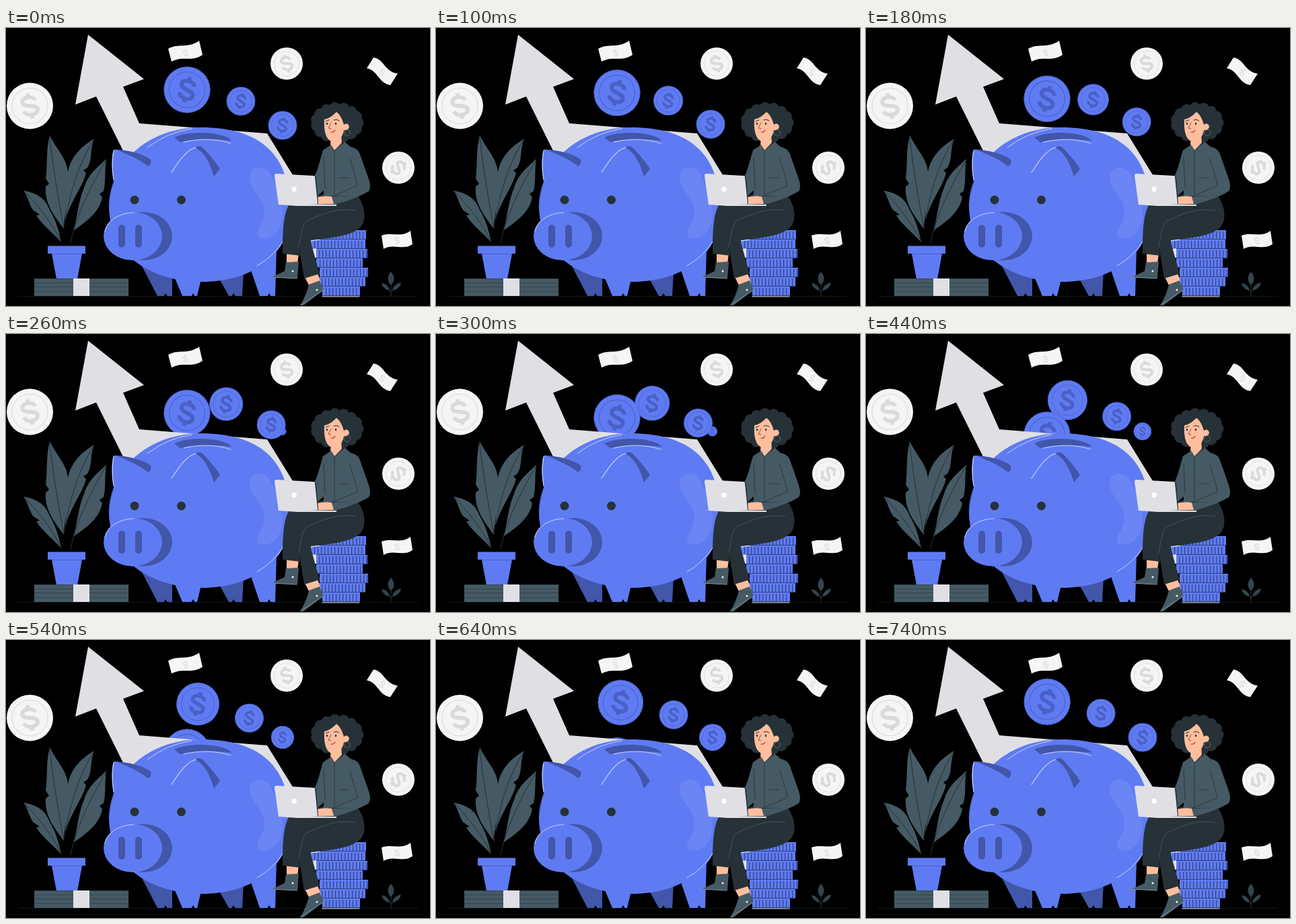
These frames come from a looping animation (630x414 px, 760 ms). An HTML page with a canvas:

```html
<!DOCTYPE html>
<html lang="en">
<head>
<meta charset="utf-8">
<title>Saving coins</title>
<style>
html, body { margin: 0; width: 100%; height: 100%; overflow: hidden; background: #000; }
canvas { display: block; }
</style>
</head>
<body>
<canvas id="stage" width="630" height="414"></canvas>
<script>
const stage = document.getElementById('stage');
const screen = stage.getContext('2d');
let ctx = screen;

const LOOP = 760;
const BLUE = '#5f7bf3', SHADE = '#4256aa', LINE = '#4a60c4', GLOW = '#6b85f5';
const INK = '#263238', SLATE = '#455a64', SLATE_LINE = '#33454e';
const PALE = '#e0e0e4', WHITE = '#f5f5f5', SKIN = '#ffbe9d';

function fill(color, d) {
  ctx.fillStyle = color;
  ctx.fill(new Path2D(d));
}

function line(color, width, d) {
  ctx.strokeStyle = color;
  ctx.lineWidth = width;
  ctx.stroke(new Path2D(d));
}

function oval(color, x, y, rx, ry = rx) {
  ctx.fillStyle = color;
  ctx.beginPath();
  ctx.ellipse(x, y, rx, ry, 0, 0, Math.PI * 2);
  ctx.fill();
}

function ring(color, width, x, y, r) {
  ctx.strokeStyle = color;
  ctx.lineWidth = width;
  ctx.beginPath();
  ctx.arc(x, y, r, 0, Math.PI * 2);
  ctx.stroke();
}

function dollar(color, x, y, size, turn) {
  ctx.save();
  ctx.translate(x, y);
  ctx.rotate(turn);
  ctx.scale(size, size);
  ctx.lineCap = 'butt';
  line(color, 0.17, 'M.27 -.2C.22 -.44 -.28 -.46 -.29 -.2C-.29 .06 .3 -.06 .3 .2C.3 .46 -.24 .46 -.29 .18M0 -.56V-.34M0 .34V.56');
  ctx.restore();
}

function coin(x, y, r, face, mark, turn) {
  if (r < 0.3) return;
  oval(face, x, y, r);
  ring(mark, Math.max(0.6, r * 0.03), x, y, r * 0.77);
  dollar(mark, x, y, r, turn);
}

function blueCoin(x, y, r) {
  coin(x, y, r, BLUE, LINE, 0.24);
  if (r > 0.5) ring(LINE, 0.9, x, y, r - 0.45);
}

function bill(d, x, y, turn) {
  fill(WHITE, d);
  dollar(PALE, x, y, 10, turn);
}

function leaf(outline, vein) {
  fill(SLATE, outline);
  line(INK, 1, vein);
}

function backdrop() {
  line('#10171a', 1, 'M18 399.5H612');

  coin(35.5, 116, 34.5, WHITE, '#dadade', -0.2);
  coin(417, 53, 24, WHITE, '#dadade', -0.25);
  coin(583, 208, 24, WHITE, '#dadade', 1.0);
  bill('M241 31C256 22 270 31 287 19L292 40C276 51 262 41 246 50Z', 267, 37, -0.2);
  bill('M546 44C562 46 562 65 582 68L571 85C553 82 553 63 536 60Z', 559, 66, 0.6);
  bill('M558 309C573 303 586 313 601 302L604 322C590 332 576 320 561 329Z', 581, 317, -0.1);
}

function plant() {
  leaf('M65 160C76 182 90 194 92 214C98 240 88 262 86 299C72 280 57 262 59 236L64 232L59 224C62 205 59 182 65 160Z',
       'M65 163C70 210 78 255 86 298');
  leaf('M131 165C124 183 129 194 121 208L115 212L119 216C113 238 99 252 88 286C90 263 88 240 92 215C96 192 111 177 131 165Z',
       'M130 167C108 202 96 242 89 284');
  leaf('M149 195C146 213 149 226 145 243L139 247L143 252C139 275 118 289 100 302C106 284 107 258 116 238C122 218 134 209 149 195Z',
       'M148 198C128 232 104 278 96 320');
  leaf('M26 242C43 246 57 250 65 271C74 286 79 303 82 319C70 305 54 294 45 279L50 278L40 271C34 262 33 252 26 242Z',
       'M28 244C50 267 70 293 82 318');

  fill(BLUE, 'M62 324.5H118V336H62ZM68 336H113L106 374H75Z');
  line(LINE, 1, 'M68 336.5H113');

  fill(SLATE, 'M42 373H182V399H42Z');
  line(SLATE_LINE, 1, 'M42 379.5H182M42 385.5H182M42 392.5H182M42 373.5H182');
  fill(PALE, 'M100 373H124V399H100Z');
}

function arrow() {
  fill(PALE, 'M122 10L205 76L174 87.5L198 142L388 157L428 222L400 245L190 215L134 102L103 114Z');
}

function pig() {
  fill(SHADE, 'M197 345L225 399H247V365ZM315 370L331 399H351L353 362Z');
  fill(BLUE, 'M249 368L262 399H284L291 370ZM362 355L377 399H400L402 328Z');
  for (const x of [237, 278, 338, 391]) fill('#000', `M${x - 3} 400L${x} 395L${x + 3} 400Z`);

  fill(BLUE, 'M153 265C156 196 215 148 290 148C372 148 426 184 421 278C421 342 360 378 292 378C243 378 207 362 184 341C162 320 153 290 153 265Z');
  fill(GLOW, 'M362 222C362 205 384 204 392 216C397 230 411 250 411 276C411 304 391 319 376 312C366 302 385 293 384 273C383 248 363 246 362 222Z');
  line('#c9d2fb', 1, 'M373 354Q397 341 412 317M210 178Q240 155 276 150');
  line(SHADE, 1, 'M153 265C154 245 159 228 167 214');

  fill(SHADE, 'M250 163C270 153 321 153 336 168C310 165 285 164 259 170Z');
  line('#c9d2fb', 1, 'M264 170C287 164 315 165 334 172');

  fill(BLUE, 'M161 231C156 212 157 190 160 181C178 181 203 188 214 197L206 204L180 214Z');
  fill(SHADE, 'M164 181C183 182 206 188 215 196Q217 203 211 206C198 195 184 190 164 181Z');
  line('#c9d2fb', 1.2, 'M160 226C157 210 158 192 160 183');

  fill(SHADE, 'M281 178Q287 174 292 178C301 187 312 200 318 210L309 221C304 205 297 186 281 178Z');
  line('#c9d2fb', 1.2, 'M246 215C256 200 268 181 282 178');

  oval(SHADE, 204, 310, 43, 36);
  oval(BLUE, 188.5, 310, 43.5, 36);
  line('#c9d2fb', 1, 'M147 303C150 286 170 275 190 275');
  ctx.fillStyle = SHADE;
  for (const x of [167, 192]) {
    ctx.beginPath();
    ctx.roundRect(x, 293, 10, 34, 5);
    ctx.fill();
  }
  oval(INK, 191, 256, 6.5);
  oval(INK, 260.5, 256, 6.5);
}

function coinStack() {
  const layers = [[455, 535], [453, 534], [460, 537], [461, 530], [466, 538], [459, 534], [470, 526]];
  layers.forEach(([left, right], i) => {
    const top = 301 + i * 14;
    ctx.fillStyle = BLUE;
    ctx.fillRect(left, top, right - left, 14);
    ctx.fillStyle = '#32427f';
    ctx.fillRect(left, top + 13, right - left, 1);
    for (let x = left + 5; x < right - 1; x += 5) ctx.fillRect(x, top + 2, 1.2, 11);
  });
  line(WHITE, 1.2, 'M453 317L466 315M470 400H525');
  fill(PALE, 'M453 329L461 328V342H455Z');
}

function hair() {
  oval(INK, 492, 141, 34, 27);
  const curls = 15;
  for (let i = 0; i < curls; i++) {
    const a = i / curls * Math.PI * 2;
    oval(INK, 492 + 31 * Math.cos(a), 141 + 22 * Math.sin(a), 8.5);
  }
}

function woman() {
  hair();

  // Legs and shoes
  fill(SKIN, 'M417 336H435L433 351H417ZM443 369L463 365L468 380L451 385Z');
  fill(SLATE, 'M416 349L435 348L433 373L394 371Q406 366 414 362Z');
  fill(SLATE, 'M450 382L466 376L472 390L442 413H437Q446 399 450 382Z');
  line('#85939a', 1, 'M394 371L432 373M438 412.5L472 390');
  oval(WHITE, 426, 362, 1.5);
  oval(WHITE, 462, 390, 1.5);
  fill(INK, 'M472 247L521 247Q535 267 532 285C529 304 507 311 452 316L466 366L443 373L435 323L437 339L411 336C411 310 411 280 420 264Z');
  line('#4a5d66', 0.8, 'M519 272C491 266 466 279 447 287C440 292 438 310 435 326');

  // Shirt and arms
  fill(SLATE, 'M483 174L471 182C466 198 463 215 456 224L463 250L472 242V250H514L484 251L487 263C505 259 526 251 539 243Q543 237 539 225L526 188Q523 179 512 177L503 169L488 181Z');
  fill(SLATE, 'M472 230H522V240L500 250H472Z');
  line(INK, 0.8, 'M472 193L474 238M488 183V247M511 194C515 211 520 221 522 235L486 250M495 223L509 223');
  fill(SKIN, 'M483 161L498 158L499 171L488 182L482 174Z');
  line(INK, 0.8, 'M483 174L488 183L503 170');

  // Face
  fill(SKIN, 'M473 136C480 135 487 129 491 125C497 129 500 137 502 144Q508 140 510 147Q509 153 502 152C501 161 494 170 485 169C475 167 472 152 473 136Z');
  line(INK, 1, 'M475 139L480 137M487 137Q491 135 495 138');
  oval(INK, 477, 142.5, 1.2, 1.7);
  oval(INK, 490, 142.5, 1.2, 1.7);
  line('#7c4a42', 0.9, 'M483 141L479 149L483 150');
  line('#b43c36', 1.2, 'M483 155Q487 156 489 152');
  ring('#60747d', 0.8, 507, 156, 4.5);

  // Laptop
  fill(SKIN, 'M462 252Q474 249 484 251L487 262H463Z');
  fill(INK, 'M457 220L461 222L464 262H460Z');
  fill(PALE, 'M402 217L457 220Q459 220 459 222L463 262L405 263L399 220Q399 217 402 217Z');
  fill(PALE, 'M405 261L491 263V265H433L405 263Z');
  oval('#fff', 428, 240, 3.7);
}

function sprout() {
  fill(SLATE_LINE, 'M572 363Q581 373 572 383Q563 373 572 363ZM558 380Q568 381 570 391Q560 389 558 380ZM587 379Q585 389 574 391Q576 381 587 379Z');
  line(INK, 1, 'M572 381V399M570 390L572 394L575 390');
}

function layer(...parts) {
  const sheet = document.createElement('canvas');
  sheet.width = stage.width;
  sheet.height = stage.height;
  ctx = sheet.getContext('2d');
  ctx.lineCap = ctx.lineJoin = 'round';
  parts.forEach(part => part());
  ctx = screen;
  return sheet;
}

const behind = layer(backdrop);
const front = layer(plant, arrow, pig, coinStack, woman, sprout);

// Each coin glides to the next stop during a loop: x, y, radius.
const stops = [[410.5, 145, 0], [411, 145, 21.3], [349, 109, 21.3], [269, 92, 34.5], [269, 186, 34.5]];

const ease = t => t * t * (3 - 2 * t);

function draw(now) {
  const p = ease(now % LOOP / LOOP);
  screen.fillStyle = '#000';
  screen.fillRect(0, 0, stage.width, stage.height);
  screen.drawImage(behind, 0, 0);
  for (let i = 0; i < stops.length - 1; i++) {
    blueCoin(...stops[i].map((from, k) => from + (stops[i + 1][k] - from) * p));
  }
  screen.drawImage(front, 0, 0);
}

const start = performance.now();
function tick() {
  draw(performance.now() - start);
  requestAnimationFrame(tick);
}
draw(0);
requestAnimationFrame(tick);
</script>
</body>
</html>
```
